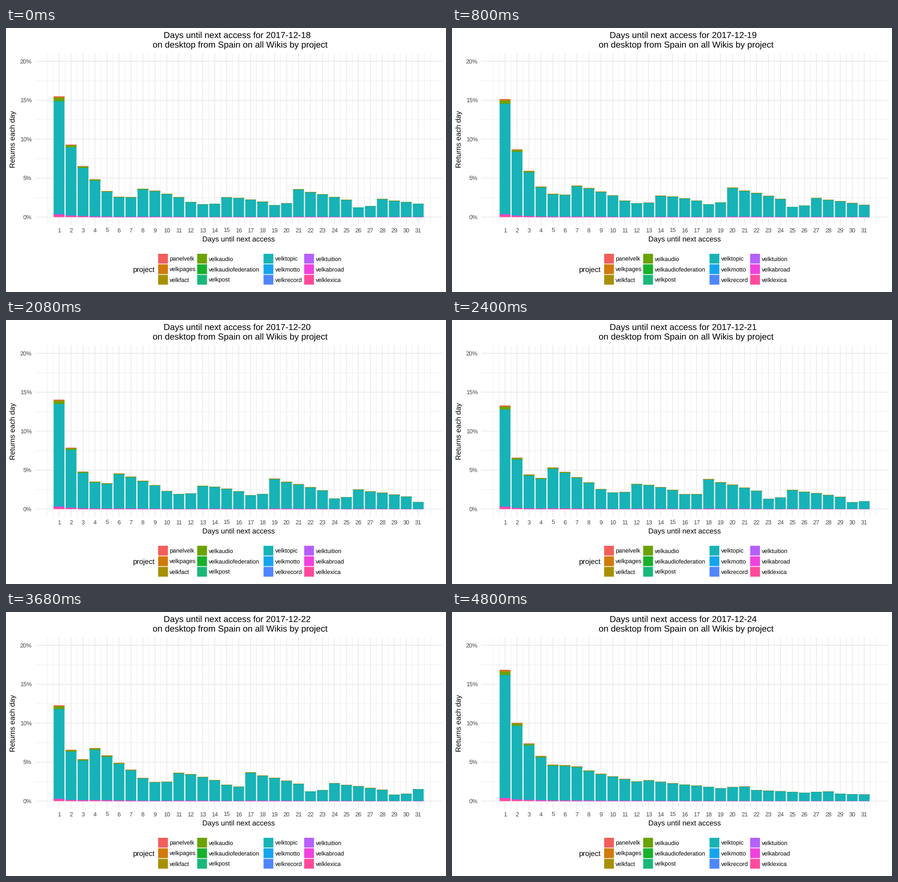
Write a matplotlib script that moves like this. It is 966x580 px and loops after 5.6 s.

```python
import matplotlib.pyplot as plt
import numpy as np
from matplotlib.animation import FuncAnimation
from matplotlib.patches import Rectangle

W, H, DPI = 966, 580, 100
TITLE, LABEL, SMALL = 19.3, 16.08, 12.85   # text sizes in pixels
GRID, GREY = "#e8e8e8", "#444444"
LAGS = np.arange(1, 32)

PROJECTS = [
    ("panelvelk", "#f35e5a"), ("velkpages", "#d17a0e"), ("velkfact", "#a89005"),
    ("velkaudio", "#6ba204"), ("velkaudiofederation", "#17b12b"), ("velkpost", "#1ab77a"),
    ("velktopic", "#17b3b7"), ("velkmotto", "#14a5ee"), ("velkrecord", "#5086ff"),
    ("velktuition", "#b65fff"), ("velkabroad", "#f042de"), ("velklexica", "#ff499d"),
]

# Activity by weekday, Monday first
HOLIDAY = np.array([0.65, 1, 1, 0.94, 0.85, 0.68, 0.6])
NORMAL = np.array([1, 0.93, 0.88, 0.8, 0.71, 0.41, 0.48])
LEISURE = np.array([0.97, 0.94, 0.92, 0.88, 0.83, 0.93, 1])

# Next-day return and power-law decay for each first visit, Monday to Sunday
FIRST = [15.5, 15.15, 14.05, 13.3, 12.3, 15.45, 16.85]
DECAY = [0.77, 0.745, 0.72, 0.72, 0.75, 0.64, 0.70]


def returns(day):
    """Percent of visitors coming back after each lag."""
    date = LAGS + day
    weekday = date % 7
    if day < 5:
        early = HOLIDAY[weekday] * (1 + 0.024 * date)
        late = NORMAL[weekday] * (2.48 - 0.035 * day ** 2)
    else:
        early = LEISURE[weekday]
        late = 0.91 * early
    late = late * 0.81 ** np.maximum(date // 7 - 3, 0)
    curve = np.where(date < 20, early, late) * LAGS ** -DECAY[day]
    return FIRST[day] * curve / curve[0]


def stack_shares():
    """Share of every project, from the bottom layer up."""
    fade = np.interp(LAGS, (1, 8), (1, 0.6))
    small = [0.019, 0.003, 0.001, 0.003, 0.001, 0, 0.0005, 0.0005,
             0.026, 0.002, 0.008, 0.004]
    shares = np.outer(small, fade)
    shares[5] = 1 - shares.sum(axis=0)
    return shares


STACK = stack_shares().cumsum(axis=0)

plt.rcParams["font.family"] = "Liberation Sans"
plt.rcParams["text.hinting"] = "none"
fig = plt.figure(figsize=(W / DPI, H / DPI), dpi=DPI, facecolor="white")


def px(size):
    return size * 72 / DPI


def put(x, y, text, size, color="black", ha="left", **kw):
    return fig.text(x / W, 1 - y / H, text, fontsize=px(size), color=color,
                    ha=ha, va="baseline", **kw)


# Panel and grid
LEFT, RIGHT, TOP, BOTTOM = 64.05, 957.5, 55.9, 432.6
ax = fig.add_axes([LEFT / W, 1 - BOTTOM / H, (RIGHT - LEFT) / W, (BOTTOM - TOP) / H])
ax.axis("off")
minor_x = np.concatenate([[0], np.arange(0.5, 32), [32]])
for xs, ys, width in ((minor_x, np.arange(2.5, 20, 5), 0.78),
                      (LAGS, np.arange(0, 21, 5), 1.56)):
    style = dict(color=GRID, lw=px(width), snap=False, zorder=1)
    for x in xs:
        ax.axvline(x, **style)
    for y in ys:
        ax.axhline(y, **style)

# Lower layers lie in front, so each bar can reach slightly under the next
layers = [ax.bar(LAGS, np.zeros(31), 0.9, color=color, linewidth=0,
                 snap=False, zorder=20 - i)
          for i, (_, color) in enumerate(reversed(PROJECTS))]
ax.set(xlim=(-0.995, 32.995), ylim=(-1, 21))

# Titles and axis labels
heading = put(508, 22.3, "", TITLE, ha="center")
put(513.6, 42.9, "on desktop from Spain on all Wikis by project", TITLE, ha="center")
put(510.8, 469, "Days until next access", LABEL, ha="center")
put(19.2, 244, "Returns each day", LABEL, ha="center", rotation=90, rotation_mode="anchor")
for value in range(0, 21, 5):
    put(56.5, 420 - value * 17.125, f"{value}%", SMALL, GREY, "right")
for lag in LAGS:
    put(116.5 + 26.287 * (lag - 1), 449.1, str(lag), SMALL, GREY, "center")

# Legend
put(279, 536, "project", LABEL)
for i, (name, color) in enumerate(PROJECTS):
    x = (334, 419.8, 565.4, 654.6)[i // 3]
    mid = 506.8 + 23.15 * (i % 3)
    fig.add_artist(Rectangle((x / W, 1 - (mid + 10.75) / H), 21.5 / W, 21.5 / H,
                             color=color, linewidth=0, snap=False))
    put(x + 25.2, mid + 4.6, name, SMALL)


def draw(day):
    heading.set_text(f"Days until next access for 2017-12-{18 + day}")
    lower = np.zeros(31)
    for bars, tops in zip(layers, STACK * returns(day)):
        base = np.maximum(lower - 0.1, 0)
        for bar, y, top in zip(bars, base, tops):
            bar.set_y(y)
            bar.set_height(top - y)
        lower = tops
    return [heading]


anim = FuncAnimation(fig, draw, frames=7, init_func=lambda: draw(0),
                     interval=800, repeat=True, blit=False)
plt.show()
```
